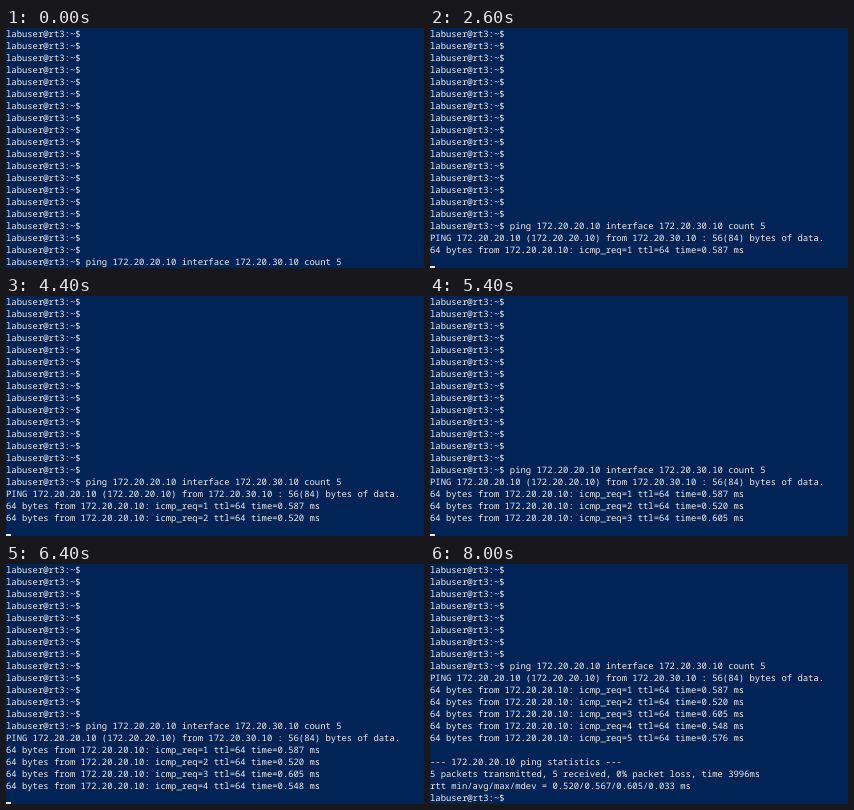
Animation of 418x240 px, one loop 8200 ms. Source, as an HTML page:

```html
<!DOCTYPE html>
<html lang="en">
<head>
<meta charset="utf-8">
<title>Ping in a terminal</title>
<style>
  :root { --row: 12px; --col: 5.3333px; --loop: 8200ms; }
  html, body { margin: 0; width: 100%; height: 100%; overflow: hidden; background: #012456; }
  .screen { position: relative; width: 418px; height: 240px; overflow: hidden; background: #012456; }

  /* The last row stays empty while the command is running. */
  .view { height: 240px; overflow: hidden; animation: rows var(--loop) step-end infinite; }
  pre {
    margin: 0;
    font: 8.8889px/var(--row) "Noto Sans Mono", "DejaVu Sans Mono", monospace;
    font-variant-ligatures: none;
    text-rendering: geometricPrecision;
    color: #eeedf0;
    animation: scroll var(--loop) step-end infinite;
  }
  .cursor {
    position: absolute; left: 0; top: 238px;
    width: var(--col); height: 2px;
    background: #eeedf0;
    animation: blink var(--loop) step-end infinite, move var(--loop) step-end infinite;
  }

  @keyframes rows {
    0% { height: 240px; }
    29.26% { height: 228px; }
    80.48%, 100% { height: 240px; }
  }
  @keyframes scroll {
    0% { transform: translateY(0); }
    29.26% { transform: translateY(calc(-1 * var(--row))); }
    31.7% { transform: translateY(calc(-3 * var(--row))); }
    43.9% { transform: translateY(calc(-4 * var(--row))); }
    56.09% { transform: translateY(calc(-5 * var(--row))); }
    68.29% { transform: translateY(calc(-6 * var(--row))); }
    80.48%, 100% { transform: translateY(calc(-11 * var(--row))); }
  }
  @keyframes move {
    0% { transform: translateX(calc(63 * var(--col))); }
    29.26% { transform: translateX(0); }
    80.48%, 100% { transform: translateX(calc(15 * var(--col))); }
  }
  @keyframes blink {
    0%, 7.31%, 19.51%, 34.14%, 46.34%, 58.53%, 73.17%, 85.36%, 97.56%, 100% { opacity: 0; }
    2.43%, 14.63%, 26.82%, 39.02%, 53.65%, 65.85%, 78.04%, 90.24% { opacity: 1; }
  }
</style>
</head>
<body>
<div class="screen">
  <div class="view"><pre id="log"></pre></div>
  <div class="cursor"></div>
</div>
<script>
  const prompt = "labuser@rt3:~$";
  const host = "172.20.20.10";
  const times = ["0.587", "0.520", "0.605", "0.548", "0.576"];

  document.getElementById("log").textContent = [
    ...Array(19).fill(prompt),
    `${prompt} ping ${host} interface 172.20.30.10 count 5`,
    `PING ${host} (${host}) from 172.20.30.10 : 56(84) bytes of data.`,
    ...times.map((ms, i) => `64 bytes from ${host}: icmp_req=${i + 1} ttl=64 time=${ms} ms`),
    "",
    `--- ${host} ping statistics ---`,
    "5 packets transmitted, 5 received, 0% packet loss, time 3996ms",
    "rtt min/avg/max/mdev = 0.520/0.567/0.605/0.033 ms",
    prompt
  ].join("\n");
</script>
</body>
</html>
```
